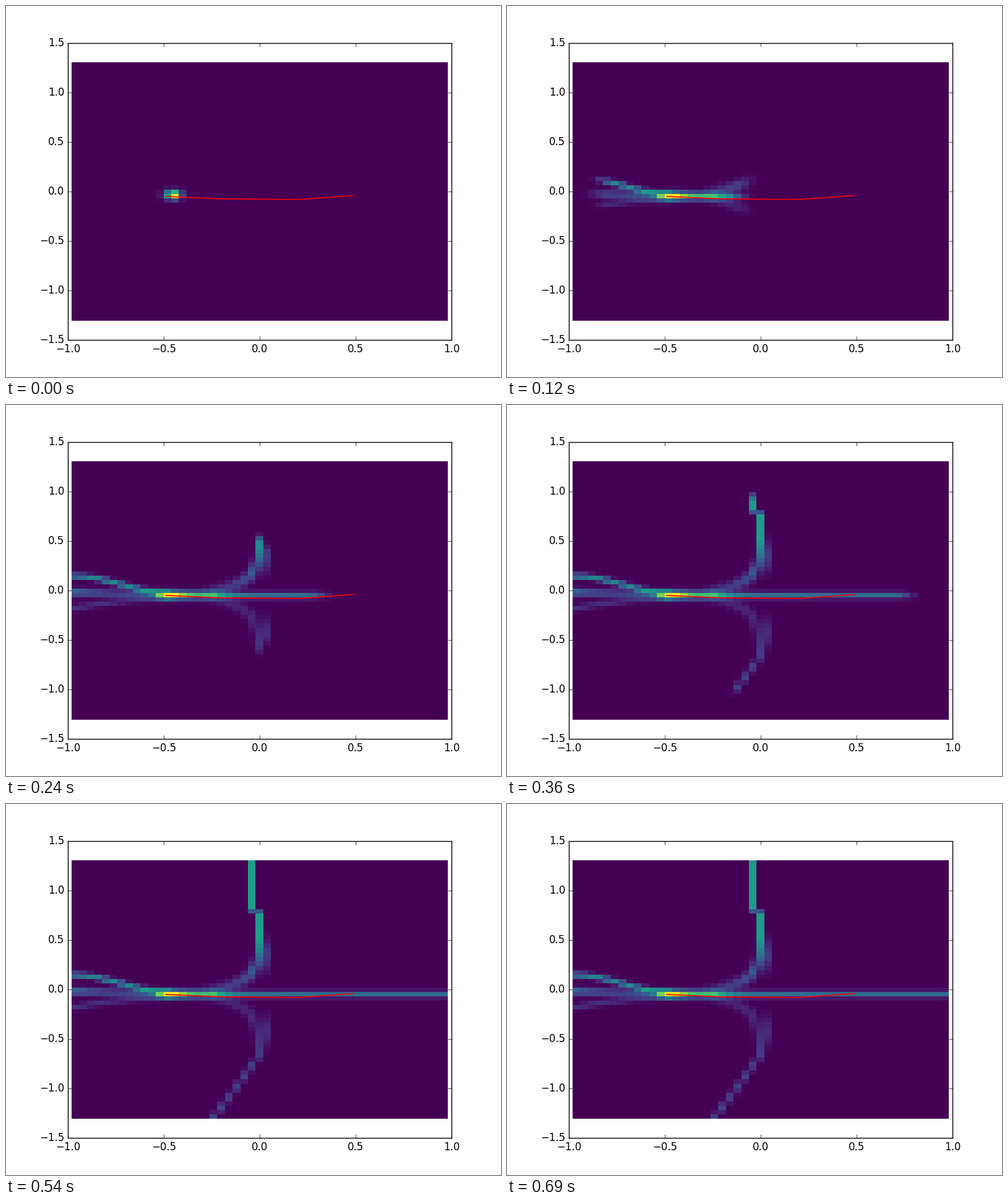
A matplotlib script that plays this animation: 800x600 px, repeating every 0.72 s.

```python
import numpy as np
import matplotlib.pyplot as plt
from matplotlib.animation import FuncAnimation

FRAMES, INTERVAL = 24, 30
COLS, ROWS = 49, 59
HALF_W, HALF_H = 0.98, 1.304
SOURCE = (12.75, -0.7)
SPEED, RAMP = 0.109, 0.1

plt.rcParams.update({
    "font.family": "DejaVu Sans", "font.size": 12,
    "axes.linewidth": 1.0, "axes.axisbelow": False,
    "xtick.direction": "in", "ytick.direction": "in",
    "xtick.top": True, "ytick.right": True,
    "xtick.major.size": 4, "ytick.major.size": 4,
    "xtick.major.width": 0.5, "ytick.major.width": 0.5,
    "xtick.major.pad": 4, "ytick.major.pad": 4,
    "ytick.alignment": "center",
})

# Cell grid: columns count from the left, rows from the middle upwards.
col, row = np.meshgrid(np.arange(COLS), np.arange(ROWS) - ROWS // 2)
cell_w, cell_h = 2 * HALF_W / COLS, 2 * HALF_H / ROWS


def sigmoid(x):
    return 1 / (1 + np.exp(-x))


def smoothstep(u):
    u = np.clip(u, 0, 1)
    return u * u * (3 - 2 * u)


class Stream:
    """A soft curve through the grid that fills up from its first point."""

    def __init__(self, x, y, level, sigma):
        x, y, self.level, sigma = np.broadcast_arrays(x, y, level, sigma)
        start = np.hypot((x[0] - SOURCE[0]) * cell_w, (y[0] - SOURCE[1]) * cell_h)
        steps = np.hypot(np.diff(x) * cell_w, np.diff(y) * cell_h)
        self.s = start + np.r_[0, np.cumsum(steps)]
        d2 = (col[..., None] - x) ** 2 + (row[..., None] - y) ** 2
        self.kernel = np.exp(-d2 / (2 * sigma ** 2))

    def field(self, front):
        reach = np.clip((front - self.s) / RAMP, 0, 1)
        return (self.kernel * (self.level * reach)).max(axis=-1)


def make_centre():
    x = np.linspace(12, 50, 191)
    near = sigmoid((18.5 - x) / 1.5)
    level = 0.35 + 0.4 * near + 0.25 * np.exp(-(x - 13) ** 2 / 1.2)
    return Stream(x, -1 - 0.03 * (1 - near), level, 0.52 + 0.12 * near)


def make_left():
    u = np.linspace(0.04, 1.1, 90)
    x = 12 * (1 - u)
    return [
        Stream(x, -0.5 + 3.9 * smoothstep(u), 0.47, 0.43),
        Stream(x, -1 + 0.65 * u, 0.22 + 0.15 * (1 - 2 * u) ** 2, 0.6),
        Stream(x, -1.9 - 2.1 * u ** 2, 0.14, 0.48),
    ]


def make_up():
    y = np.linspace(0, 32, 161)
    x = 24 - 6 * np.exp(-y / 2.2) - sigmoid((y - 18) / 0.25)
    level = 0.15 + 0.4 * np.minimum(y / 12, 1)
    return Stream(x, y, level, 0.3 + 0.5 * np.exp(-(y / 5) ** 2))


def make_down():
    y = np.linspace(1.8, 32, 151)
    x = 24 - 6 * np.exp((1.8 - y) / 2.4) - 0.42 * np.maximum(y - 15, 0)
    level = 0.1 + 0.1 * np.minimum(y / 17, 1) ** 2
    return Stream(x, -y, level, 0.33 + 0.45 * np.exp(-(y / 8) ** 2))


def make_bulge(mid, peak):
    y = mid + np.sign(mid) * np.linspace(-5, 6, 45)
    return Stream(25, y, peak * np.exp(-((y - mid) / 3.2) ** 2), 0.33)


centre = make_centre()
branches = make_left() + [make_up(), make_down(),
                          make_bulge(8, 0.17), make_bulge(-9.5, 0.12)]
blob = 1.1 * np.exp(-(col - SOURCE[0]) ** 2 - (row - SOURCE[1]) ** 2)


def density(frame):
    front = 0.02 + SPEED * frame
    core = np.maximum(blob / (1 + frame / 4), centre.field(front))
    return np.clip(core + sum(b.field(front) for b in branches), 0, 1)


def cell_edges(half, count, px_per_unit):
    """Even edges, the inner ones rounding down to whole pixels."""
    edges = np.linspace(-half, half, count + 1)
    edges[1:-1] -= 0.45 / px_per_unit
    return edges


fig = plt.figure(figsize=(8, 6), dpi=100, facecolor="white")
ax = fig.add_axes([0.125, 0.1, 0.775, 0.8])
mesh = ax.pcolormesh(cell_edges(HALF_W, COLS, 310), cell_edges(HALF_H, ROWS, 160),
                     density(0), cmap="viridis", vmin=0, vmax=1)
ax.plot([-0.49, -0.2, 0.21, 0.49], [-0.05, -0.075, -0.08, -0.04],
        color="red", lw=1.2)
ax.set(xlim=(-1, 1), ylim=(-1.5, 1.5),
       xticks=np.arange(-1, 1.1, 0.5), yticks=np.arange(-1.5, 1.6, 0.5))


def update(frame):
    mesh.set_array(density(frame))
    return [mesh]


anim = FuncAnimation(fig, update, frames=FRAMES, interval=INTERVAL,
                     repeat=True, repeat_delay=0, blit=False)
plt.show()
```
